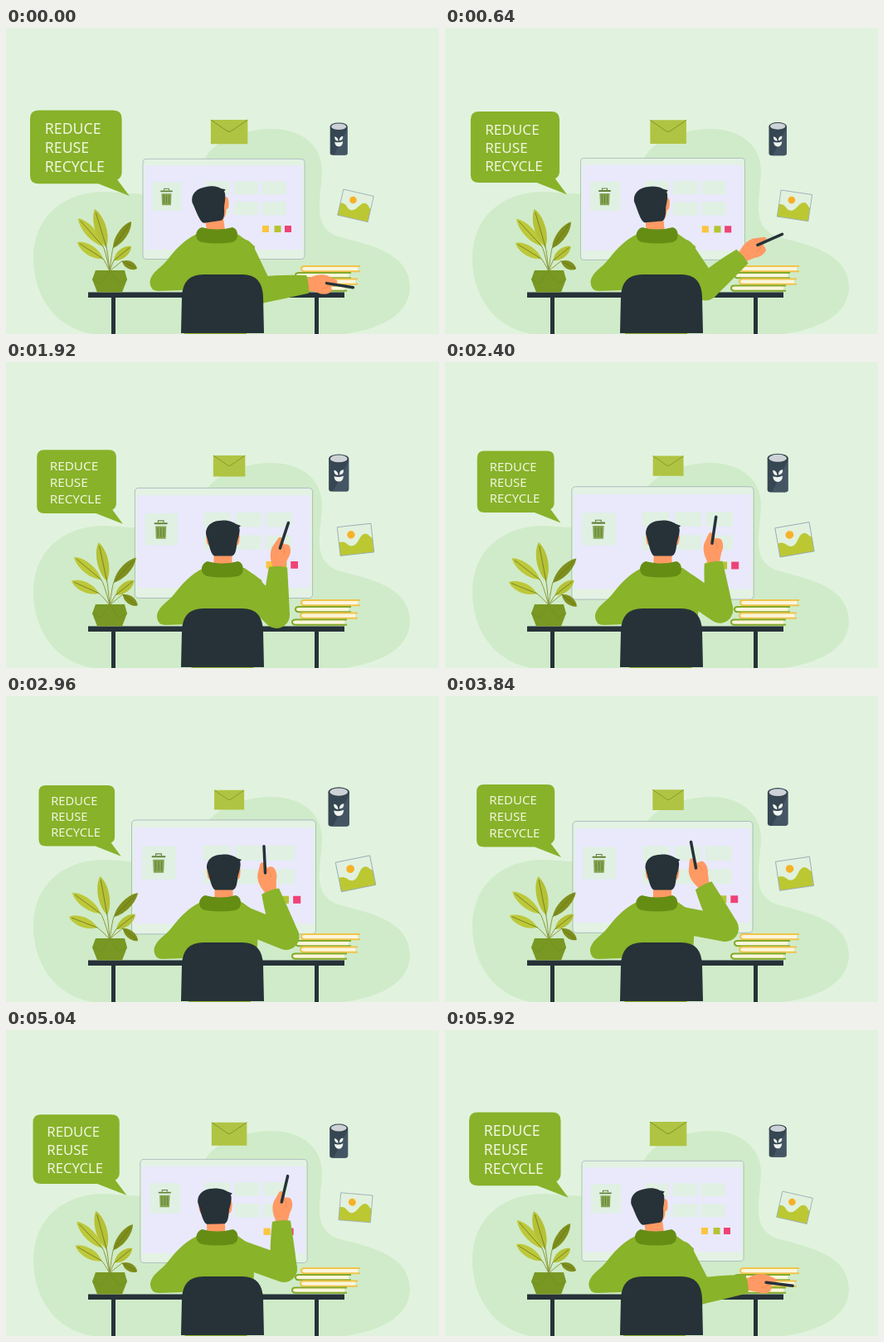
Recreate the animation shown at these times as an HTML page. Size 522 px wide and 370 px high, loop 6000 ms.

```html
<!DOCTYPE html>
<html lang="en">
<head>
<meta charset="utf-8">
<title>Reduce, reuse, recycle</title>
<style>
html, body { margin: 0; width: 100%; height: 100%; overflow: hidden; background: #e1f3de; }
svg { display: block; width: 522px; height: 370px; }
text { font: 500 17.7px "Noto Sans", "Open Sans", sans-serif; fill: #f0f6df; }
</style>
</head>
<body>
<svg viewBox="0 0 522 370">
  <path fill="#d0ebc9" d="M33 278C33 228 70 198 118 198C160 199 236 215 238 165C240 140 285 122 320 122C360 122 382 145 381 175C379 210 369 240 400 252C435 262 487 270 487 314C486 345 455 365 400 371H110C60 365 33 325 33 278Z"/>

  <g id="bubble">
    <path fill="#88b22a" d="M-45-44H45Q55.3-44 55.3-34V31Q55.3 37 50 40L64.500 59.500L27 44.800H-45Q-55.3 44.800-55.3 35V-34Q-55.3-44-45-44Z"/>
    <text x="-37.5" y="-15.2">REDUCE</text>
    <text x="-37.5" y="7.8">REUSE</text>
    <text x="-37.5" y="30.8">RECYCLE</text>
  </g>

  <g id="mail">
    <path fill="#b0c443" d="M-22-14.5H22V14.5H-22Z"/>
    <path fill="none" stroke="#7c8f27" stroke-width=".9" d="M-22-14.5L-2-.8Q0 .4 2-.8L22-14.5"/>
  </g>

  <g id="can">
    <path fill="#364753" d="M-10.5-15V17Q-10.5 19.5-7 19.5H7Q10.5 19.5 10.5 17V-15Z"/>
    <path fill="#4f6170" d="M10.5-13V17Q10.5 19.5 7 19.5H-6Z" opacity=".6"/>
    <ellipse cy="-15" rx="10.5" ry="4.8" fill="#34434e"/>
    <ellipse cy="-15" rx="9" ry="3.8" fill="#cdd2d6"/>
    <path fill="#eef4ee" d="M-.6 2.500Q-5.500 2-5-3Q-.5-2-.6 2.500ZM.6 2Q.5-3 5-3.500Q5.500 1.500 .6 2ZM-5 3.500Q0 5 5 3Q4.500 9 0 9Q-4.500 9-5 3.500Z"/>
  </g>

  <g id="photo">
    <path fill="#e1f1de" d="M-18.7-16H18.7V16H-18.7Z"/>
    <circle cx="-4.5" cy="-6" r="4.3" fill="#f7b126"/>
    <path fill="#bcc832" d="M-18.5 1C-10-1-10 7-4 6.500C3 6 4-5 11-5.500C15-5 16-1 18.500 0V15.800H-18.500Z"/>
    <path fill="none" stroke="#8c9fae" stroke-width=".7" d="M-18.7-16H18.7V16H-18.7Z"/>
  </g>

  <g id="screen">
    <rect x="-97.5" y="-60.5" width="195" height="121.2" rx="4" fill="#e3f2e3" stroke="#98a9b2" stroke-width=".65"/>
    <path fill="#e9e9fb" d="M-95-52.5H95V49.5H-95Z"/>
    <g id="tiles" fill="#e0f0e3"></g>
    <g transform="translate(1 -1)" stroke="#64833a" fill="#86a653">
      <path d="M-76.5-20.5H-63.5" stroke-width="1.8" stroke-linecap="round"/>
      <path d="M-73-21.5V-23.5H-67V-21.5" fill="none"/>
      <path d="M-76-17.5H-64L-64.6-3.5H-75.4Z" stroke="none"/>
      <path d="M-73.2-16V-5.5M-70-16V-5.5M-66.8-16V-5.5"/>
    </g>
    <path fill="#fbc540" d="M46.5 20.2h8v8h-8z"/>
    <path fill="#b5c334" d="M61 20.2h8v8h-8z"/>
    <path fill="#ef4277" d="M73.5 20.2h8v8h-8z"/>
  </g>

  <g id="books"></g>
  <path fill="#263238" d="M99 319.5H408V326H377V370H372V326H132V370H127V326H99Z"/>
  <g id="leaves" stroke-linecap="round"></g>
  <path fill="#789823" d="M108 293H143L146 304L140 319.5H110L104 304Z"/>
  <path fill="none" stroke="#6f8f20" stroke-width=".7" d="M104 304L114 309L125 294L136 309L146 304"/>

  <path id="body" fill="#89b329" d="M230 249C215 256 204 268 194 281C186 291 174 296 173.500 308Q174 318 184 318L215 317V370H290L298 302L300 264L279 249Z"/>
  <g id="head">
    <path id="skin" fill="#ff9a64" d="M-18-6Q-21-5-20 1Q-19.5 9-16 9Q-14 17-11 20V36H11V20Q15 16 16 9Q19.5 9 20 1Q21-5 18-6Z"/>
    <path fill="#263238" d="M-20.500-5C-21-16-12-21.300-2-21.300C5-22 12-20 16-17L21.500-15L19.500-13C21.500-9 18.500 0 17 5C16 15 15 20 11 21.500H-10C-15 20-17 6-20.500-5Z"/>
  </g>
  <path id="collar" fill="#658d14" d="M236 241Q254 246 273 241Q279 243 279 250Q279 258 273 259Q254 262 236 259Q229 257 229 250Q230 243 236 241Z"/>

  <path id="upper" fill="none" stroke="#89b329" stroke-width="32" stroke-linecap="round"/>
  <g id="forearm">
    <path fill="#ff9a64" d="M-2-6L8-9Q17-11 24-8L35-1Q38 2 34 4L28 6Q29 12 25 13.5Q18 16 10 11L-2 7Z"/>
    <path stroke="#263238" stroke-width="3.5" stroke-linecap="round" d="M23 1.5L54 10.500"/>
    <path fill="none" stroke="#ef8550" stroke-width=".8" d="M16 7Q22 8 26 5"/>
    <path fill="#89b329" d="M-58-16Q-30-16 0-11Q2 0 0 11Q-30 14-58 16Z"/>
  </g>
  <path fill="#263238" d="M211 369L212 325Q213 298 238 298H285Q309 298 310 325L311 369Z"/>
</svg>
<script>
const PERIOD = 6000, STEP = 80;
const $ = id => document.getElementById(id);
const mix = (a, b, p) => a + (b - a) * p;
const sine = u => (1 - Math.cos(Math.PI * u)) / 2;

// time, body shift, head x, head turn, elbow x, elbow y, arm angle
const poses = [
  [0, 0, 244, 1, 306, 317, -7],
  [1200, 4.5, 253.5, .2, 325, 307, -81],
  [1920, 8.5, 261.5, 0, 326, 306, -88],
  [2960, 5, 262.5, 0, 337.5, 291, -109],
  [3840, 1.5, 262, 0, 338, 281, -117],
  [5040, .5, 251.5, .2, 335, 289, -93]
];

// Smooth closed curve through the poses
function poseAt(t) {
  const n = poses.length;
  const key = i => {
    const k = poses[(i + n) % n].slice();
    k[0] += Math.floor(i / n) * PERIOD;
    return k;
  };
  let i = n - 1;
  while (poses[i][0] > t) i--;
  const [a, b, c, d] = [key(i - 1), key(i), key(i + 1), key(i + 2)];
  const span = c[0] - b[0], s = (t - b[0]) / span;
  return b.map((v, j) => {
    const m0 = (c[j] - a[j]) / (c[0] - a[0]) * span;
    const m1 = (d[j] - v) / (d[0] - b[0]) * span;
    return v * (2*s**3 - 3*s*s + 1) + c[j] * (3*s*s - 2*s**3)
      + m0 * (s**3 - 2*s*s + s) + m1 * (s**3 - s*s);
  });
}

// base x, y, tip x, y at both ends of the sway, half width, colour
const leaves = [
  [129, 266, 151, 234, 130, 267, 159, 238, 8, '#7f8f1d'],
  [117, 264, 87, 230, 114, 263, 80, 238, 9, '#bdc83a'],
  [121, 265, 107, 219, 122, 265, 113.5, 218, 10, '#b5c136'],
  [117, 279, 86, 259, 110, 280, 76, 267, 9, '#bdc83a'],
  [130, 281, 151, 264, 133, 282, 156, 264, 8, '#b5c136'],
  [140, 282, 158, 291, 141, 281, 159, 296, 7, '#7f8f1d']
];

function leaf(l, p) {
  const [bx, by, tx, ty] = [0, 1, 2, 3].map(i => mix(l[i], l[i + 4], p));
  const len = Math.hypot(tx - bx, ty - by);
  const nx = (by - ty) / len * l[8], ny = (tx - bx) / len * l[8];
  const side = s => `${mix(bx, tx, .3) + s * nx} ${mix(by, ty, .3) + s * ny} `
    + `${mix(bx, tx, .8) + s * nx * .8} ${mix(by, ty, .8) + s * ny * .8}`;
  const back = side(-1).split(' ');
  return `<path d="M125 294Q${mix(125, bx, .7)} ${by + 3} ${bx} ${by}" fill="none" stroke="#8b9a3c"/>
    <path d="M${bx} ${by}C${side(1)} ${tx} ${ty}C${back[2]} ${back[3]} ${back[0]} ${back[1]} ${bx} ${by}Z" fill="${l[9]}"/>
    <path d="M${bx} ${by}L${mix(bx, tx, .9)} ${mix(by, ty, .9)}" stroke="#677719" stroke-width=".8"/>`;
}

const tile = (x, y, w, h) => `<rect x="${x}" y="${y}" width="${w}" height="${h}" rx="1"/>`;
$('tiles').innerHTML = tile(-86.5, -32.5, 36, 35)
  + [-22, 12.5, 46].map(x => tile(x, -33.5, 29, 16) + tile(x, -8.5, 29, 16)).join('');

$('books').innerHTML = [
  [355, 427, 287, '#f0c44c'], [348, 416, 295, '#83aa28'],
  [354, 424, 302.5, '#f0c44c'], [344, 411, 310.5, '#83aa28']
].map(([x, r, y, c]) => `<path fill="#fbf6dc" d="M${x + 2} ${y + 1}H${r - 3}V${y + 7}H${x + 2}Z"/>
  <path fill="none" stroke="${c}" stroke-width="2" d="M${r} ${y + 1}H${x + 5}Q${x + 1} ${y + 1} ${x + 1} ${y + 4}T${x + 5} ${y + 7.3}H${r}"/>`).join('');

const place = (id, x, y, angle = 0, scale = 1) =>
  $(id).setAttribute('transform', `translate(${x} ${y}) rotate(${angle}) scale(${scale})`);

function draw(t) {
  const u = 1 - Math.abs(t / PERIOD * 2 - 1);
  const p = sine(u), q = sine(u ** .82);

  place('bubble', mix(84.3, 85.3, q), mix(143.4, 144.5, q), 0, mix(1, .828, q));
  place('mail', 269.1, 125.7, 0, mix(1.01, .82, p));
  place('can', 401.2, 134.2, 0, mix(1, 1.21, p));
  place('photo', 421.5, 214.8, mix(13, -11.5, q), mix(1, 1.13, p));
  place('screen', 262.5, 218.8, 0, mix(1, 1.138, p));
  $('leaves').innerHTML = leaves.map(l => leaf(l, p)).join('');

  const [, shift, headX, turn, ex, ey, angle] = poseAt(t);
  const rad = angle * Math.PI / 180;
  place('body', shift, 0);
  place('collar', shift * .8, 0);
  place('head', headX + turn * 1.5, 213, -8 * turn);
  $('skin').setAttribute('transform', `translate(${3 * turn} 0)`);
  $('upper').setAttribute('d', `M${284 + shift * .8} 271L${ex} ${ey}`);
  place('forearm', ex + 58 * Math.cos(rad), ey + 58 * Math.sin(rad), angle);
}

const start = performance.now();
function tick() {
  const t = (performance.now() - start) % PERIOD;
  draw(Math.floor(t / STEP) * STEP);
  requestAnimationFrame(tick);
}
tick();
</script>
</body>
</html>
```
